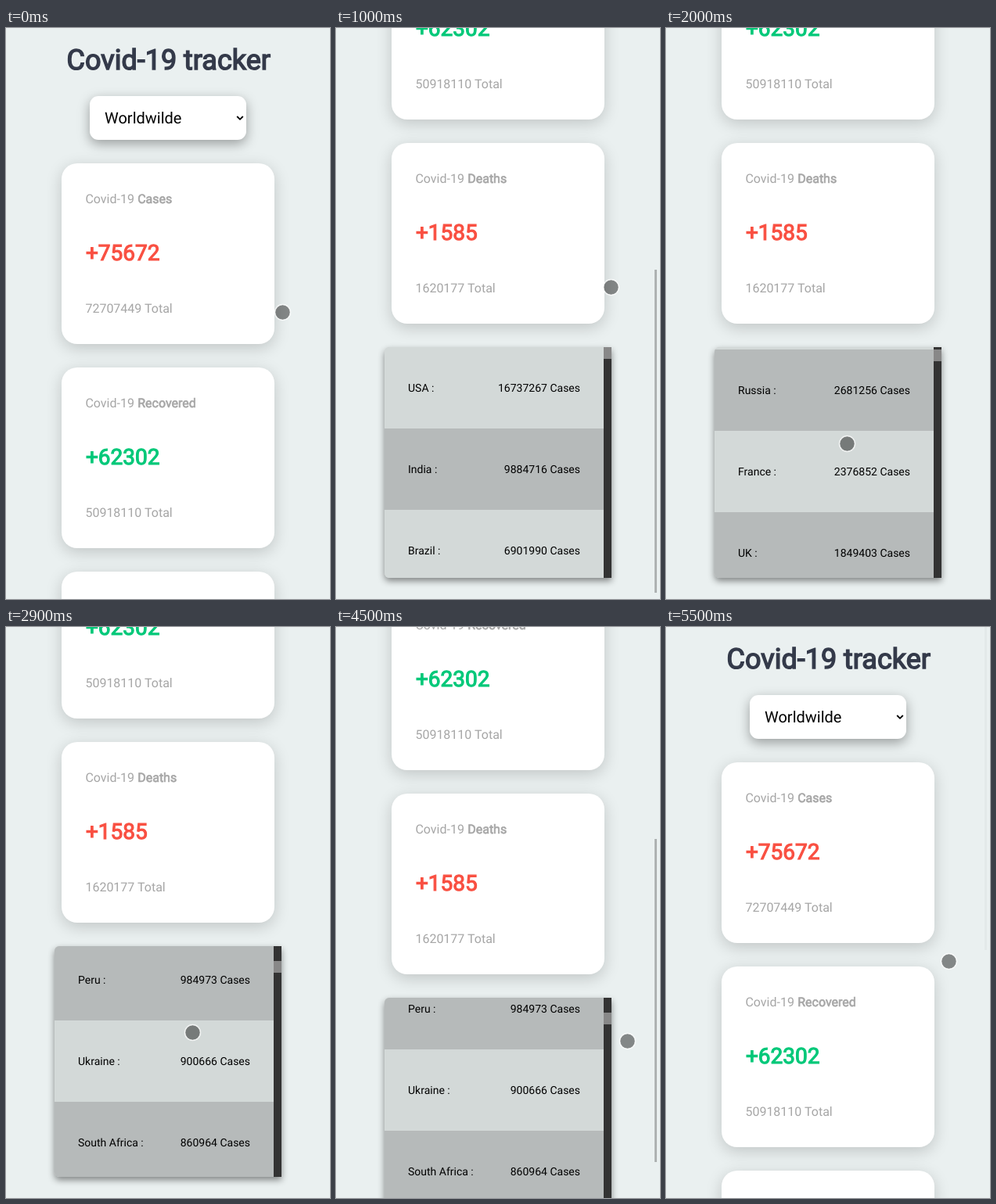
Recreate the animation shown at these times as an HTML page with a canvas. Size 414 by 730 pixels, loop 6400 ms.

```html
<!DOCTYPE html>
<html lang="en">
<head>
<meta charset="utf-8">
<title>Tracker</title>
<style>
  html, body { margin: 0; width: 100%; height: 100%; overflow: hidden; background: #eaf0f0; }
  canvas { display: block; width: 414px; height: 730px; }
</style>
</head>
<body>
<canvas id="stage"></canvas>
<script>
const W = 414, H = 730, LOOP = 6400, STEP = 100;
const canvas = document.getElementById('stage');
const ctx = canvas.getContext('2d');
const dpr = window.devicePixelRatio || 1;
canvas.width = W * dpr;
canvas.height = H * dpr;

const GREY = '#a6a6a6', RED = '#f95042', GREEN = '#02c879';
const ROW = 104, PAGE_MAX = 548;
const LIST = { x: 62, y: 956, w: 290, h: 295, bar: 10 };
const CARDS = [
  ['Cases', '+75672', '72707449', RED],
  ['Recovered', '+62302', '50918110', GREEN],
  ['Deaths', '+1585', '1620177', RED]
];

// Known case counts; the rest follow a falling curve
const COUNTRIES = ('USA,India,Brazil,Russia,France,UK,Italy,Turkey,Spain,Argentina,Colombia,' +
  'Germany,Mexico,Poland,Iran,Peru,Ukraine,South Africa,Indonesia,Netherlands,Belgium').split(',');
const KNOWN = {
  USA: 16737267, India: 9884716, Brazil: 6901990, Russia: 2681256, France: 2376852, UK: 1849403,
  Peru: 984973, Ukraine: 900666, 'South Africa': 860964, Indonesia: 623309
};
const cases = (name, i) => KNOWN[name] || Math.round(1849403 * Math.exp(-0.0627 * (i - 5)));

// Turning points of the finger: time, x, y
const FINGER = [
  [0, 353, 363], [300, 356, 560], [1000, 351, 331], [1500, 230, 640], [2000, 231, 531],
  [2400, 236, 374], [2800, 236, 374], [2900, 238, 518], [3100, 240, 688], [3400, 239, 575],
  [3700, 245, 650], [4200, 396, 312], [4500, 372, 529], [4900, 363, 477], [5000, 363, 477],
  [5500, 361, 427]
];

const ramp = (t, a, b) => Math.min(1, Math.max(0, (t - a) / (b - a)));
const smooth = (t, a, b) => {
  const p = ramp(t, a, b);
  return p * p * (3 - 2 * p);
};

const pageScroll = t => PAGE_MAX * (smooth(t, 200, 1000) - smooth(t, 4389, 4900));

const listScroll = t => 309 * smooth(t, 1400, 2000) + 1260 * smooth(t, 2000, 2400)
  + ROW * smooth(t, 3000, 3400) - 75 * smooth(t, 3600, 4100);

const barAlpha = t => ramp(t, 100, 200) - ramp(t, 1300, 1600)
  + ramp(t, 4200, 4300) - 0.88 * ramp(t, 5100, 5500);

function fingerAt(t) {
  const i = FINGER.findIndex(k => k[0] > t);
  if (i < 0) return FINGER[FINGER.length - 1].slice(1);
  const [t0, x0, y0] = FINGER[i - 1], [t1, x1, y1] = FINGER[i];
  const p = smooth(t, t0, t1);
  return [x0 + (x1 - x0) * p, y0 + (y1 - y0) * p];
}

function raised(x, y, w, h, r, fill, dy, blur, alpha) {
  ctx.save();
  ctx.shadowColor = `rgba(0,0,0,${alpha})`;
  ctx.shadowOffsetY = dy * dpr;
  ctx.shadowBlur = blur * dpr;
  ctx.beginPath();
  ctx.roundRect(x, y, w, h, r);
  ctx.fillStyle = fill;
  ctx.fill();
  ctx.restore();
}

function text(str, x, y, size, color, align = 'left') {
  ctx.font = `400 ${size}px Roboto, Arial, sans-serif`;
  ctx.textRendering = 'geometricPrecision';
  ctx.textAlign = align;
  ctx.fillStyle = color;
  ctx.fillText(str, x, y);
  return ctx.measureText(str).width;
}

// Regular outlines thickened towards the top right
function heavy(str, x, y, size, color, align) {
  const grow = size / 24;
  x += grow / 2;
  y -= grow / 2;
  text(str, x, y, size, color, align);
  ctx.strokeStyle = color;
  ctx.lineWidth = grow;
  ctx.lineJoin = 'miter';
  ctx.miterLimit = 3;
  ctx.strokeText(str, x, y);
}

function header() {
  heavy('Covid-19 tracker', 207, 54, 36, '#343a4a', 'center');
  raised(107, 87, 200, 56, 11, '#fff', 5, 15, 0.35);
  text('Worldwilde', 126, 122, 20, '#000');
  ctx.beginPath();
  ctx.moveTo(295.2, 113);
  ctx.lineTo(299, 116.8);
  ctx.lineTo(302.8, 113);
  ctx.strokeStyle = '#000';
  ctx.lineWidth = 1.8;
  ctx.stroke();
}

function card([label, today, total, color], i) {
  const x = 101.4, y = 173 + i * 261;
  raised(71, y, 272, 231, 20, '#fff', 5, 20, 0.18);
  const w = text('Covid-19 ', x, y + 51, 16, GREY);
  heavy(label, x + w, y + 51, 16, GREY);
  heavy(today, x, y + 125, 28, color);
  text(total + ' Total', x, y + 191, 16, GREY);
}

function list(scroll) {
  const { x, y, w, h, bar } = LIST;
  const corners = [6, 0, 0, 6];
  raised(x, y, w, h, corners, '#d3d9d8', 4, 8, 0.45);
  ctx.save();
  ctx.beginPath();
  ctx.roundRect(x, y, w, h, corners);
  ctx.clip();
  COUNTRIES.forEach((name, i) => {
    const top = y + i * ROW - scroll;
    if (top > y + h || top + ROW < y) return;
    ctx.fillStyle = i % 2 ? '#b6baba' : '#d3d9d8';
    ctx.fillRect(x, top, w - bar, ROW);
    text(name + ' :', x + 30, top + 57, 14, '#000');
    text(cases(name, i) + ' Cases', x + 250, top + 57, 14, '#000', 'right');
  });
  ctx.fillStyle = '#333';
  ctx.fillRect(x + w - bar, y, bar, h);
  ctx.fillStyle = '#888';
  ctx.fillRect(x + w - bar, y + Math.floor(scroll * 0.0124), bar, 15);
  ctx.restore();
}

function disc(x, y) {
  ctx.beginPath();
  ctx.arc(x + 0.5, y + 0.5, 9.5, 0, Math.PI * 2);
  ctx.fillStyle = 'rgba(0,0,0,0.44)';
  ctx.fill();
  ctx.beginPath();
  ctx.arc(x + 0.5, y + 0.5, 10, 0, Math.PI * 2);
  ctx.strokeStyle = 'rgba(255,255,255,0.7)';
  ctx.lineWidth = 1.5;
  ctx.stroke();
}

function draw(t) {
  const page = Math.round(pageScroll(t));
  ctx.setTransform(dpr, 0, 0, dpr, 0, 0);
  ctx.fillStyle = '#eaf0f0';
  ctx.fillRect(0, 0, W, H);

  ctx.translate(0, -page);
  header();
  CARDS.forEach(card);
  list(Math.round(listScroll(t)));
  ctx.translate(0, page);

  ctx.fillStyle = `rgba(0,0,0,${0.26 * barAlpha(t)})`;
  ctx.fillRect(407, Math.floor(page * 0.564), 3, 413);
  disc(...fingerAt(t).map(Math.round));
}

const start = performance.now();
function tick() {
  const t = (performance.now() - start) % LOOP;
  draw(Math.floor(t / STEP) * STEP);
  requestAnimationFrame(tick);
}
tick();
</script>
</body>
</html>
```
